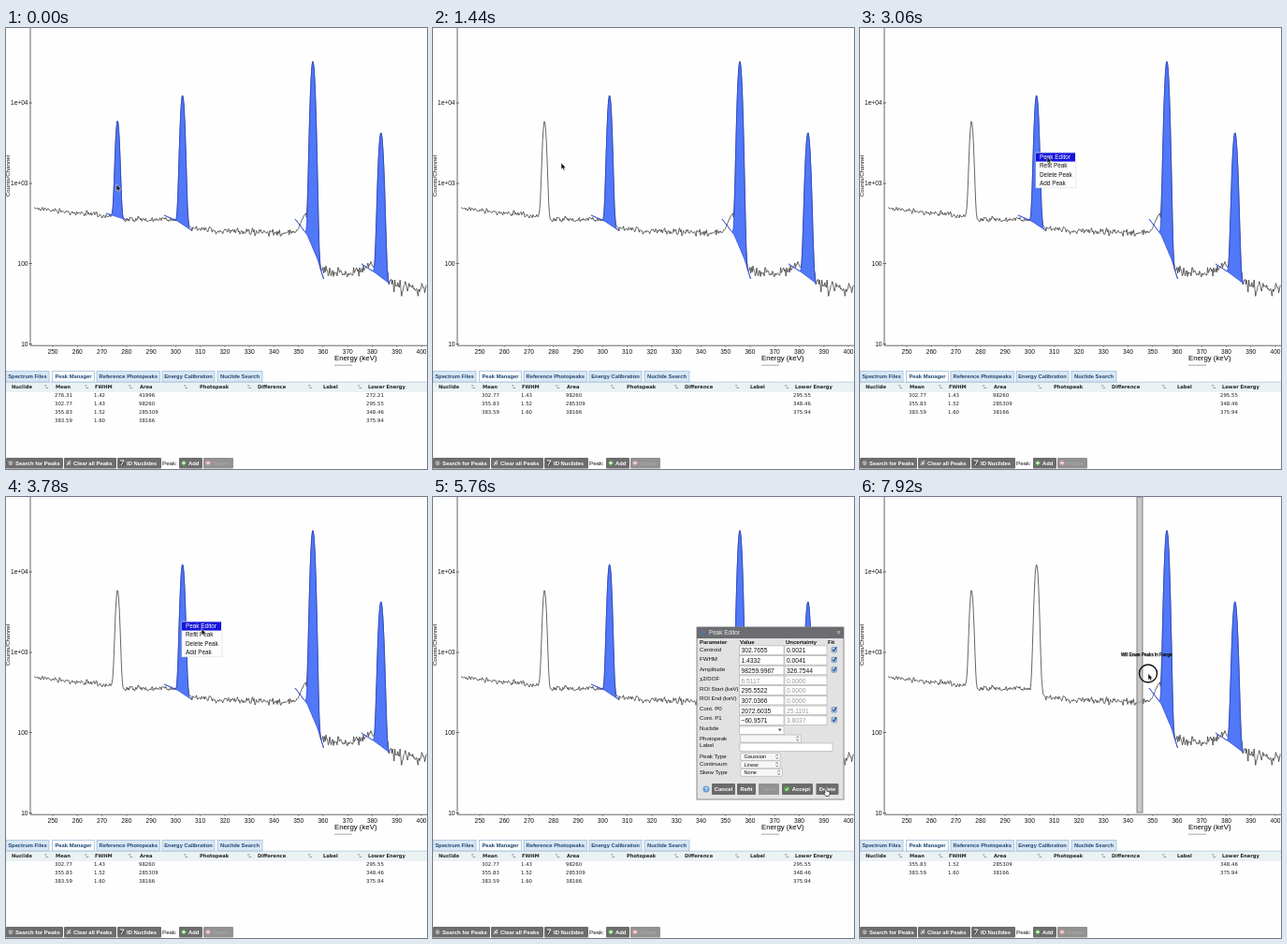
An HTML page that plays this animation: 450x471 px, repeating every 8 s.

```html
<!DOCTYPE html>
<html lang="en">
<head>
<meta charset="utf-8">
<title>Peak manager</title>
<style>
html, body { margin: 0; width: 100%; height: 100%; overflow: hidden; background: #fff; }
svg { display: block; width: 450px; height: 471px; font-family: "Liberation Sans", Arial, sans-serif; }
text { white-space: pre; }
.wide { font-family: "DejaVu Sans", Verdana, sans-serif; }
</style>
</head>
<body>
<svg id="stage" viewBox="0 0 450 471"></svg>
<script>
const LOOP = 8000, STEP = 180;
const K = 37.2; // pixels per natural log unit of the count axis

const text = (x, y, s, size, color = '#111', more = '') =>
  `<text x="${x}" y="${y}" font-size="${size}" fill="${color}" ${more}>${s}</text>`;
const rect = (x, y, w, h, fill, more = '') =>
  `<rect x="${x}" y="${y}" width="${w}" height="${h}" fill="${fill}" ${more}/>`;
const line = (d, color, w, fill = 'none') =>
  `<path d="${d}" stroke="${color}" stroke-width="${w}" fill="${fill}" stroke-linejoin="round"/>`;
const dot = (x, y, r, fill) => `<circle cx="${x}" cy="${y}" r="${r}" fill="${fill}"/>`;
const path = pts => 'M' + pts.map(p => p[0].toFixed(1) + ' ' + p[1].toFixed(1)).join('L');
const bold = 'font-weight="bold" ', mid = 'text-anchor="middle" ';

// Value at x on a list of [x, ...values]
function along(pts, x, k = 1) {
  if (x <= pts[0][0]) return pts[0][k];
  const i = pts.findIndex(p => p[0] >= x);
  if (i < 0) return pts.at(-1)[k];
  const a = pts[i - 1], b = pts[i];
  return a[k] + (b[k] - a[k]) * (x - a[0]) / (b[0] - a[0]);
}

const peaks = [
  { x: 119.2, top: 101.5, a: 6, gone: 1440, cont: [[107, 198], [128, 204.5]],
    row: ['276.31', '1.42', '41996', '272.21'] },
  { x: 188.7, top: 72.8, a: 5.3, gone: 5940, cont: [[169, 200], [183, 206], [198, 216]],
    row: ['302.77', '1.43', '98260', '295.55'] },
  { x: 328, top: 35.8, a: 5.2, gone: Infinity, cont: [[309, 204], [322, 221], [333, 247], [339.5, 268]],
    row: ['355.83', '1.52', '285309', '348.46'] },
  { x: 400.8, top: 112.3, a: 4.2, gone: Infinity, cont: [[380, 252], [394, 261], [410, 273]],
    row: ['383.59', '1.60', '38166', '375.94'] }
];
const base = [[30, 192], [60, 196], [100, 199.5], [114, 201], [125, 204.5], [180, 204.5],
  [186, 207], [194, 213], [230, 217], [300, 219], [311, 217], [316, 204], [320, 200],
  [323, 215], [333, 240], [336, 258], [365, 262], [380, 259], [391, 252], [395, 259],
  [407, 272], [416, 276], [450, 279]];

// Counts add up, so heights combine through the log scale
const addPeak = (y, p, x) =>
  -K * Math.log(Math.exp(-y / K) + Math.exp(-(p.top + p.a * (x - p.x) ** 2) / K));

function peakShape(p) {
  const x0 = p.cont[0][0], x1 = p.cont.at(-1)[0], top = [], low = [];
  for (let x = x0; x <= x1; x += 0.5) {
    const y = along(p.cont, x);
    top.push([x, addPeak(y, p, x)]);
    low.unshift([x, y]);
  }
  return line(path(top.concat(low)) + 'Z', '#2a45cf', 0.8, '#5078f8');
}

function spectrum() {
  let seed = 7;
  const rnd = () => (seed = seed * 16807 % 2147483647) / 2147483647;
  const pts = [];
  for (let x = 30; x <= 450; x += 0.8) {
    const y = peaks.reduce((v, p) => addPeak(v, p, x), along(base, x));
    pts.push([x, y + (rnd() + rnd() + rnd() - 1.5) * 2.5 * Math.exp((y - 195) / 74)]);
  }
  return line(path(pts), '#333', 0.75);
}

function chart() {
  let s = line('M26 0V339.2H450', '#555', 0.9);
  [['1e+04', 80], ['1e+03', 166], ['100', 251.5], ['10', 337.5]].forEach(([t, y]) => {
    s += line(`M24.5 ${y}H28`, '#555', 0.8) + text(23.5, y + 2.4, t, 6.6, '#111', 'text-anchor="end"');
  });
  for (let e = 250; e <= 400; e += 10) {
    const x = 50 + (e - 250) * 2.627;
    s += line(`M${x} 339v2`, '#777', 0.7) + text(x, 348.2, e, 6.6, '#111', mid);
  }
  return s + text(351, 354.8, 'Energy (keV)', 7.8, '#000')
    + text(0, 0, 'Counts/Channel', 6.2, '#111', mid + 'transform="translate(3.6 158) rotate(-90)"')
    + rect(351, 359.5, 19, 1.5, '#c4c4c4');
}

function table() {
  let s = rect(0, 378, 450, 11, '#ebf2f4') + line('M0 378.2H450', '#a9c3dc', 0.7);
  [['Spectrum Files', 0, 46], ['Peak Manager', 49.5, 45], ['Reference Photopeaks', 97, 67.5],
   ['Energy Calibration', 167, 56], ['Nuclide Search', 226, 48]].forEach(([t, x, w], i) => {
    s += rect(x, 366.5, w, 11.5, i == 1 ? '#f8fbfd' : '#d9e7f4', 'stroke="#a3c0dd" stroke-width=".8"')
      + text(x + w / 2, 374, t, 5.8, '#1f4570', bold + mid);
  });
  [['Nuclide', 6, 43], ['Mean', 53, 86], ['FWHM', 95, 133], ['Area', 143, 192], ['Photopeak', 207, 260],
   ['Difference', 269, 325], ['Label', 339, 378], ['Lower Energy', 387, 0]].forEach(([t, x, mark]) => {
    s += text(x, 385.3, t, 5.2, '#222', bold + 'class="wide"');
    if (mark) s += line(`M${mark - 2} 382h2.4m-1 2.4h2.8`, '#888', 0.9);
  });
  return s;
}

function toolbar() {
  const button = (x, w, t, icon, fill = '#6d6d6d', ink = '#fff') =>
    rect(x, 459, w, 11.5, fill, 'rx="1"') + dot(x + 5, 464.6, 2.7, icon) + text(x + 10, 466.8, t, 5.9, ink, bold);
  return button(0, 61, 'Search for Peaks', '#999')
    + line('M3.5 463l2 2l-1 2', '#ddd', 0.8)
    + button(62, 56, 'Clear all Peaks', '#888') + line('M65 467l4-5m-3 2l3 2', '#eee', 1)
    + button(119, 47, 'ID Nuclides', '#555') + line('M122 462h4l-3 5', '#eee', 1)
    + text(167, 466.8, 'Peak:', 6.2)
    + button(185, 25, 'Add', '#55a845') + line('M188 464.6h4m-2-2v4', '#fff', 1)
    + button(211, 32, 'Delete', '#d9a5a5', '#929292', '#a6a6a6') + line('M214.3 464.6h3.4', '#fff', 1);
}

const cursor = (x, y) =>
  `<path transform="translate(${x} ${y})" d="M0 0V7L1.6 5.6L2.8 8.2L4 7.6L2.9 5.2H5Z" fill="#111" stroke="#fff" stroke-width=".5"/>`;

const hand = (x, y) =>
  `<path transform="translate(${x} ${y})" d="M0 0.5Q1 -.6 1.8 .5V3L5 3.8V6.5L4 8.5H1L-1.5 5L0 5Z" fill="#fff" stroke="#222" stroke-width=".7"/>`;

function menu(x, y, w, items, at) {
  const hot = Math.floor((at - y) / 9.25);
  return rect(x, y, w, items.length * 9.25 + 0.8, '#fdfdfd', 'stroke="#ddd" stroke-width=".6"')
    + items.map((t, i) => (i == hot ? rect(x, y + i * 9.25 + 0.4, w - 1, 9.2, '#1414dc') : '')
      + text(x + 4, y + i * 9.25 + 7.2, t, 6.4, i == hot ? '#fff' : '#111')).join('');
}

function editor() {
  const frame = 'stroke="#aaa" stroke-width=".6"';
  const field = (x, y, w, t, ink) => rect(x, y - 7.5, w, 9.5, '#fff', frame) + text(x + 2, y, t, 6.7, ink);
  const select = (y, w, t) => rect(328.5, y - 6.2, w, 8, '#f7f7f7', frame + ' rx="2"')
    + text(332.5, y - 0.2, t, 5.6)
    + line(`M${w + 323.5} ${y - 3}l1.2-1.7l1.2 1.7m-2.4 1.4l1.2 1.7l1.2-1.7`, '#444', 0.6);
  let s = rect(282, 139, 157, 184, '#e2e2e2', 'stroke="#8a8a8a"')
    + rect(282, 139, 157, 12, '#6b6d70') + dot(289, 145, 2, '#4a78b8')
    + text(295, 147.3, 'Peak Editor', 6.4, '#f0f0f0') + line('M432 143l3 3m0-3l-3 3', '#ddd', 0.8);
  [['Parameter', 285], ['Value', 328], ['Uncertainty', 377], ['Fit', 422]]
    .forEach(([t, x]) => { s += text(x, 157.1, t, 6, '#111', bold); });
  // label, value, uncertainty, fit flag
  [['Centroid', '302.7655', '0.0021', 1], ['FWHM', '1.4332', '0.0041', 1],
   ['Amplitude', '98259.9967', '326.7544', 1], ['χ2/DOF', '6.5117', '0.0000', 0],
   ['ROI Start (keV)', '295.5522', '0.0000', 0], ['ROI End (keV)', '307.0366', '0.0000', 0],
   ['Cont. P0', '2072.6035', '25.1101', 1], ['Cont. P1', '−60.9571', '3.8037', 1]]
    .forEach(([name, value, dev, fit], i) => {
      const y = 166.4 + i * 10.7;
      s += text(285, 164.7 + i * 10.53, name, 6.1)
        + field(327.5, y, 47.5, value, i == 3 ? '#999' : '#111')
        + field(376, y, 45, dev, i < 3 ? '#111' : '#999');
      if (fit) s += rect(426, y - 6, 5.5, 5.5, '#9cc3ef', 'stroke="#5d88ba" stroke-width=".6" rx="1"')
        + line(`M427.2 ${y - 3.4}l1.4 1.7l2.6-4.4`, '#123', 1);
    });
  [['Nuclide', 249.4], ['Photopeak', 260], ['Label', 266.8], ['Peak Type', 278.7], ['Continuum', 287.4], ['Skew Type', 296]]
    .forEach(([t, y]) => { s += text(285, y, t, 6.1); });
  s += rect(327.5, 245, 47.5, 8.5, '#fff', frame) + line('M369 247.5h3.6l-1.8 3Z', 'none', 0, '#555')
    + select(260.3, 65, '') + rect(328, 263, 99, 8.5, '#fff', frame)
    + select(279.6, 43, 'Gaussian') + select(288, 43, 'Linear') + select(296.5, 45, 'None')
    + dot(292, 312, 3.6, '#6c9fd8') + text(292, 314.2, '?', 6, '#fff', bold + mid);
  [['Cancel', 298, 25], ['Refit', 325, 20], ['Next', 348, 22], ['Accept', 373, 33], ['Delete', 409.5, 24]]
    .forEach(([t, x, w], i) => {
      s += rect(x, 306, w, 12, i == 2 ? '#929292' : '#6b6b6b', 'rx="1"')
        + text(x + w / 2 + (i == 3 ? 4 : 0), 314.2, t, 5.9, i == 2 ? '#a4a4a4' : '#fff', bold + mid);
    });
  return s + dot(378, 312, 2.7, '#4fae4a') + line('M376.6 312l1.2 1.3l2-2.8', '#fff', 0.9);
}

// time, x, y of the pointer
const route = [[0, 118, 167], [180, 118, 167], [540, 119, 122], [900, 137, 154], [1080, 137, 154],
  [1260, 137, 144], [1440, 137, 144], [2160, 178, 165], [2700, 188, 134], [3240, 206, 139],
  [3780, 209, 140.5], [4320, 240, 170], [5400, 419, 311], [6120, 419, 311], [7200, 295, 185],
  [7560, 296, 185], [7740, 302, 187], [7920, 308, 188.5]];

const stage = document.getElementById('stage');
stage.innerHTML = rect(0, 0, 450, 471, '#fefefe') + chart() + spectrum() + '<g id="fills"></g>'
  + table() + toolbar() + '<g id="over"></g>';
const fills = document.getElementById('fills'), over = document.getElementById('over');
const shapes = peaks.map(peakShape), dialog = editor();
const items = ['Peak Editor', 'Refit Peak', 'Delete Peak', 'Add Peak', 'Combine Cont. Right'];

function draw(t) {
  const x = along(route, t), y = along(route, t, 2);
  const within = (a, b) => t >= a && t < b;
  const left = peaks.filter(p => t < p.gone);
  fills.innerHTML = left.map(p => shapes[peaks.indexOf(p)]).join('');
  let s = left.map(({ row }, i) => [52, 94, 142, 385].map((cx, k) =>
    text(cx, 394.3 + i * 8.9, row[k], 5.4, '#222', 'class="wide"')).join('')).join('');
  if (within(540, 1440)) s += menu(119, 121, 67, items, y);
  if (within(2700, 3960)) s += menu(188, 133, 43, items.slice(0, 4), y);
  if (within(4140, 5940)) s += dialog;
  if (t >= 7740) {
    const end = Math.max(297, along(route, t - STEP));
    s += rect(296, 0, end - 296, 337, '#bbb', 'fill-opacity=".8" stroke="#777" stroke-width=".9"')
      + text(279, 169.6, 'Will Erase Peaks In Range', 4.6, '#111', 'stroke="#111" stroke-width=".25"')
      + `<circle cx="${x}" cy="${y}" r="9.5" fill="none" stroke="#111" stroke-width="1.4"/>`;
  }
  if (within(5400, 5940)) s += hand(x, y);
  else if (!within(5940, 7200)) s += cursor(x, y);
  over.innerHTML = s;
}

let shown = -1;
function tick() {
  const t = Math.floor(performance.now() % LOOP / STEP) * STEP;
  if (t !== shown) draw(shown = t);
  requestAnimationFrame(tick);
}
tick();
</script>
</body>
</html>
```
